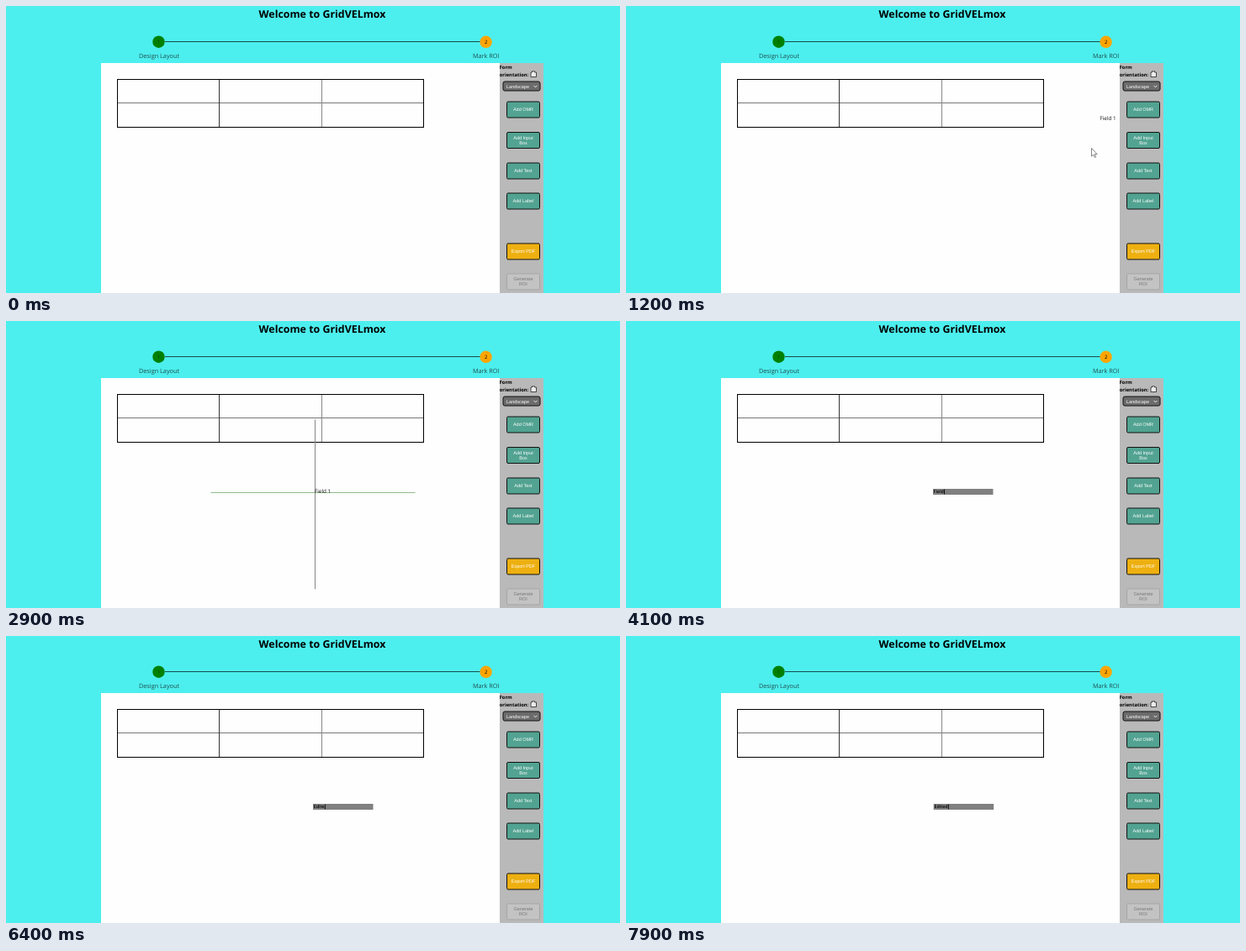
Animation of 730 by 342 pixels, one loop 8000 ms. Source, as an HTML page:

```html
<!DOCTYPE html>
<html lang="en">
<head>
<meta charset="utf-8">
<style>
  html, body { margin: 0; width: 100%; height: 100%; overflow: hidden; background: #4cefee; }
  svg { display: block; text-rendering: geometricPrecision; }
  text { font-family: "Open Sans", "Noto Sans", sans-serif; white-space: pre; }
  .ui { font: 5.5px "Liberation Sans", sans-serif; text-anchor: middle; }
  .mid { text-anchor: middle; }
  .bold { font-weight: 700; }
  .field { font-size: 6.3px; fill: #111; }
</style>
</head>
<body>
<svg width="730" height="342" viewBox="0 0 730 342">
  <rect width="730" height="342" fill="#4cefee"/>
  <text class="mid bold" x="376" y="14.2" font-size="12.4">Welcome to GridVELmox</text>

  <path d="M189 42.5H564" stroke="#174b4b"/>
  <circle cx="181.5" cy="42.7" r="7.2" fill="#008000"/>
  <circle cx="570.6" cy="42.8" r="7.2" fill="#ffa500"/>
  <g class="mid">
    <text x="181.5" y="45" font-size="6" fill="#003c00">1</text>
    <text x="570.6" y="45.2" font-size="6">2</text>
    <g font-size="7.3" fill="#234f4f">
      <text x="182" y="61.5">Design Layout</text>
      <text x="570.7" y="61.5">Mark ROI</text>
    </g>
  </g>

  <rect x="113" y="68" width="474" height="274" fill="#fefefe"/>
  <g fill="none">
    <path d="M132 115.5H497" stroke="#777"/>
    <path d="M253.5 88V144" stroke="#333"/>
    <path d="M375.5 88V144" stroke="#888"/>
    <rect x="132.5" y="87.5" width="364" height="57" stroke="#000"/>
  </g>

  <rect x="587" y="68" width="52" height="274" fill="#b9b9b9"/>
  <g class="bold" font-size="5.8">
    <text x="586.7" y="75.2">Form</text>
    <text x="586.7" y="83.5">orientation:</text>
  </g>
  <path d="M624 79H625.5V77.8H628.5V79H630.5V84.5H624Z" fill="#eee" stroke="#222" stroke-width=".8"/>
  <rect x="591" y="90" width="44" height="11" rx="2" fill="#6b6b6b" stroke="#111"/>
  <text class="ui" x="608.5" y="97.5" fill="#fff">Landscape</text>
  <path d="M627.5 94.8L629.5 96.8L631.5 94.8" fill="none" stroke="#fff" stroke-width=".9"/>
  <g id="buttons"></g>

  <g id="cross">
    <path id="across" d="M-124 0H119"/>
    <path id="down" d="M0 -87V115"/>
  </g>
  <text id="label" class="field">Field 1</text>
  <g id="editor">
    <rect x="365" y="200" width="71.5" height="7" fill="#808080"/>
    <text id="typed" x="365.8" y="205.3" font-size="5.3" font-weight="600"></text>
    <rect id="caret" y="200.6" width=".9" height="5.8"/>
  </g>
  <path id="cursor" d="M0 0V9.6L2.2 7.6L3.7 11L5.2 10.3L3.7 7.1H6.7Z" fill="#fff" stroke="#666" stroke-width=".8"/>
</svg>
<script>
const $ = id => document.getElementById(id);
const show = (id, on) => $(id).setAttribute('display', on ? 'inline' : 'none');
const place = (id, [x, y]) => $(id).setAttribute('transform', `translate(${x} ${y})`);

function button(y, lines, fill = '#52a391', ink = '#fff', edge = '#111') {
  const text = lines.map((line, i) =>
    `<text class="ui" x="615" y="${y + 1.9 + (i - (lines.length - 1) / 2) * 6}" fill="${ink}">${line}</text>`);
  return `<rect x="595.5" y="${y - 9.5}" width="39" height="19" rx="1.5" fill="${fill}" stroke="${edge}"/>${text.join('')}`;
}
$('buttons').innerHTML = [
  button(123.5, ['Add OMR']),
  button(160, ['Add Input', 'Box']),
  button(196.5, ['Add Text']),
  button(232.5, ['Add Label']),
  button(292.5, ['Export PDF'], '#eeb011'),
  button(328.5, ['Generate', 'ROI'], '#c3c3c3', '#777', '#a5a5a5')
].join('');

// Keys are [time, x, y]
const cursorPath = [[200, 646, 118], [700, 612, 233], [900, 612, 233], [1200, 553.5, 169.5],
  [1500, 568, 134], [1800, 568, 134], [2100, 424.5, 187.5], [2700, 372, 203]];
const labelPath = [[1800, 564, 136], [2100, 438.5, 183.5], [2300, 395.5, 196.5], [2700, 367.5, 204.5]];
const edits = [[3500, 'Field 1'], [3800, 'Field '], [4100, 'Field'], [4200, 'Fiel'], [4400, 'Fie'],
  [4600, 'Fi'], [4700, 'F'], [4900, ''], [5100, 'E'], [5600, 'Ed'], [5900, 'Edi'], [6100, 'Edit'],
  [6400, 'Edite'], [6700, 'Edited']];

function along(path, t) {
  const next = path.findIndex(key => key[0] > t);
  if (next === 0) return path[0].slice(1);
  if (next < 0) return path[path.length - 1].slice(1);
  const [a, b] = [path[next - 1], path[next]];
  const k = (t - a[0]) / (b[0] - a[0]);
  return [a[1] + (b[1] - a[1]) * k, a[2] + (b[2] - a[2]) * k];
}

function render(t) {
  const editing = t >= 3500;
  const dragging = t >= 1900 && t < 3100;
  show('cursor', t >= 200 && t < 2800 || t >= 3100 && t < 3500);
  place('cursor', along(cursorPath, t));

  const [x, y] = along(labelPath, t).map(v => Math.floor(v) + (t < 1900 ? 0 : .5));
  show('label', t >= 1000 && !editing);
  place('label', [x - .5, y + .2]);
  show('cross', dragging);
  place('cross', [x, y]);
  $('across').setAttribute('stroke', t < 2400 ? '#999' : '#91bb8c');
  $('down').setAttribute('stroke', t < 2400 ? '#b4efb4' : '#858585');

  show('editor', editing);
  if (editing) {
    $('typed').textContent = edits.filter(edit => edit[0] <= t).pop()[1];
    $('caret').setAttribute('x', 366 + $('typed').getComputedTextLength());
    place('editor', [t >= 7500 ? .7 : 0, 0]);
  }
}

function frame(now) {
  render(Math.floor(now % 8000 / 100) * 100);
  requestAnimationFrame(frame);
}
render(0);
requestAnimationFrame(frame);
</script>
</body>
</html>
```
